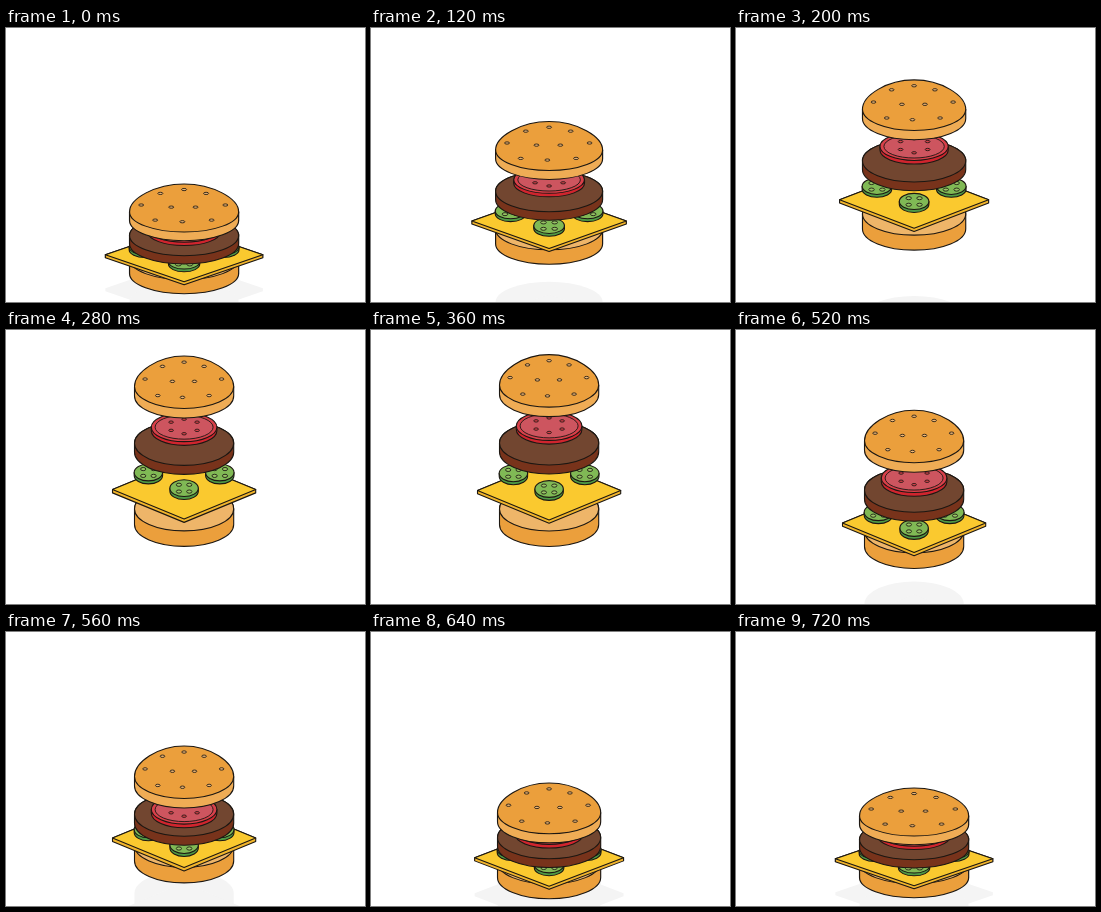
An HTML page without scripts that plays this animation: 359x274 px, repeating every 0.76 s.

```html
<!DOCTYPE html>
<html lang="en">
<head>
<meta charset="utf-8">
<title>Jumping burger</title>
<style>
  @property --t { syntax: "<number>"; inherits: true; initial-value: 0; }

  html, body { margin: 0; width: 100%; height: 100%; overflow: hidden; background: #fff; }

  /* --t counts 40 ms ticks; the jump peaks at tick 8 */
  svg { display: block; width: 359px; height: 274px; animation: tick 760ms steps(19, end) -4ms infinite; }
  @keyframes tick { from { --t: 0; } to { --t: 19; } }

  .squash {
    --q: calc(1 - pow(min(1, var(--t) / 6.5), 2) + clamp(0, (var(--t) - 14.8) / 3, 1));
    transform: scale(calc(1 + .1 * var(--q)), calc(1 - .085 * var(--q)));
  }

  /* rest: landed height, lift: jump height, out/in: easing powers, fall: ticks back to rest */
  .layer {
    --up: pow(max(0, (8 - max(var(--t), .75)) / 7.25), var(--out));
    --down: pow(clamp(0, (var(--t) - 8) / var(--fall), 1), var(--in));
    transform: translateY(calc(1px * (var(--rest) - var(--lift) * (1 - var(--up) - var(--down)))));
  }
  .top    { --rest: -66.8; --lift: 124;  --out: 2;    --in: 2.57; --fall: 6.79; }
  .tomato { --rest: -48.2; --lift: 102;  --out: 1.9;  --in: 2.42; --fall: 6.54; }
  .patty  { --rest: -40.9; --lift: 93;   --out: 1.88; --in: 2.04; --fall: 6.84; }
  .pickle { --rest: -12.7; --lift: 76;   --out: 1.87; --in: 1.7;  --fall: 7.12; }
  .cheese { --rest: -20;   --lift: 66.5; --out: 2.08; --in: 1.78; --fall: 7.24; }
  .bun    { --rest: .6;    --lift: 51.5; --out: 2.6;  --in: 2.43; --fall: 7.05; }

  .burger { stroke: #1c1712; stroke-width: 1.1; stroke-linejoin: round; }
  .shadow { fill: #f4f4f4; }
  #seed, #hole { stroke-width: .85; }
</style>
</head>
<body>
<svg viewBox="0 0 359 274">
  <defs>
    <ellipse id="seed" rx="2.3" ry="1.2"/>
    <ellipse id="hole" rx="2.6" ry="1.6" fill="#97c465"/>
    <path id="bunSide" d="M-49.6-15.5V0a49.6 22 0 0 0 99.2 0V-15.5a49.6 22 0 0 0-99.2 0z"/>
    <path id="pattySide" d="M-49.6 0v9a49.6 22 0 0 0 99.2 0V0a49.6 22 0 0 0-99.2 0z"/>
    <path id="cheeseSide" d="M-71.6 0L0-29.5 71.6 0v3.3L0 32.8-71.6 3.3z"/>
    <g id="slice">
      <path d="M-14.2 0v3a14.2 8.4 0 0 0 28.4 0V0z" fill="#4f9a45"/>
      <ellipse rx="14.2" ry="8.4" fill="#80b955"/>
      <use href="#hole" x="-5.2" y="-3.4"/>
      <use href="#hole" x="5.2" y="-3.4"/>
      <use href="#hole" x="-5.2" y="3.4"/>
      <use href="#hole" x="5.2" y="3.4"/>
    </g>
  </defs>

  <g transform="translate(178.1 245)">
    <g class="squash">
      <!-- the shadow mirrors the lower layers about the floor -->
      <g class="shadow" transform="scale(1 -1)">
        <g class="layer bun"><use href="#bunSide"/></g>
        <g class="layer cheese"><use href="#cheeseSide"/></g>
        <g class="layer patty"><use href="#pattySide"/></g>
      </g>

      <g class="burger">
        <g class="layer bun">
          <use href="#bunSide" fill="#eb9f3c"/>
          <ellipse cy="-15.5" rx="49.6" ry="22" fill="#eeb569"/>
        </g>

        <g class="layer cheese">
          <use href="#cheeseSide" fill="#f2b52b"/>
          <path d="M-71.6 0L0-29.5 71.6 0 0 29.5z" fill="#fac92f"/>
        </g>

        <g class="layer pickle">
          <use href="#slice" x="-35.7" y="-15.7"/>
          <use href="#slice" x="35.7" y="-15.7"/>
          <use href="#slice"/>
        </g>

        <g class="layer patty">
          <use href="#pattySide" fill="#78331b"/>
          <ellipse rx="49.6" ry="22" fill="#724630"/>
        </g>

        <g class="layer tomato">
          <path d="M-32.8 0v3.7a32.8 14.5 0 0 0 65.6 0V0z" fill="#d0252e"/>
          <ellipse rx="32.8" ry="14.5" fill="#d8404a"/>
          <ellipse rx="29" ry="12" fill="#cd555f" stroke-width=".9"/>
          <g fill="#d8404a">
            <use href="#seed" x="-13" y="-5"/>
            <use href="#seed" y="-8"/>
            <use href="#seed" x="13" y="-5"/>
            <use href="#seed" x="-13" y="3.2"/>
            <use href="#seed" y="6.6"/>
            <use href="#seed" x="13" y="3.2"/>
          </g>
        </g>

        <g class="layer top">
          <path d="M-49.6 0v9.5a49.6 22 0 0 0 99.2 0V0z" fill="#efac55"/>
          <path d="M-49.6 0C-49.6-14.5-26-30.5 0-30.5S49.6-14.5 49.6 0a49.6 22 0 0 1-99.2 0z" fill="#eb9f3c"/>
          <g fill="#efb877">
            <use href="#seed" y="-24.4"/>
            <use href="#seed" x="-21.6" y="-20.2"/>
            <use href="#seed" x="20" y="-20.2"/>
            <use href="#seed" x="-39" y="-7.5"/>
            <use href="#seed" x="37.5" y="-7.5"/>
            <use href="#seed" x="-11.7" y="-5.2"/>
            <use href="#seed" x="10.4" y="-5.2"/>
            <use href="#seed" x="-26.3" y="9"/>
            <use href="#seed" x="25" y="9"/>
            <use href="#seed" x="-1.6" y="10.8"/>
          </g>
        </g>
      </g>
    </g>
  </g>
</svg>
</body>
</html>
```
